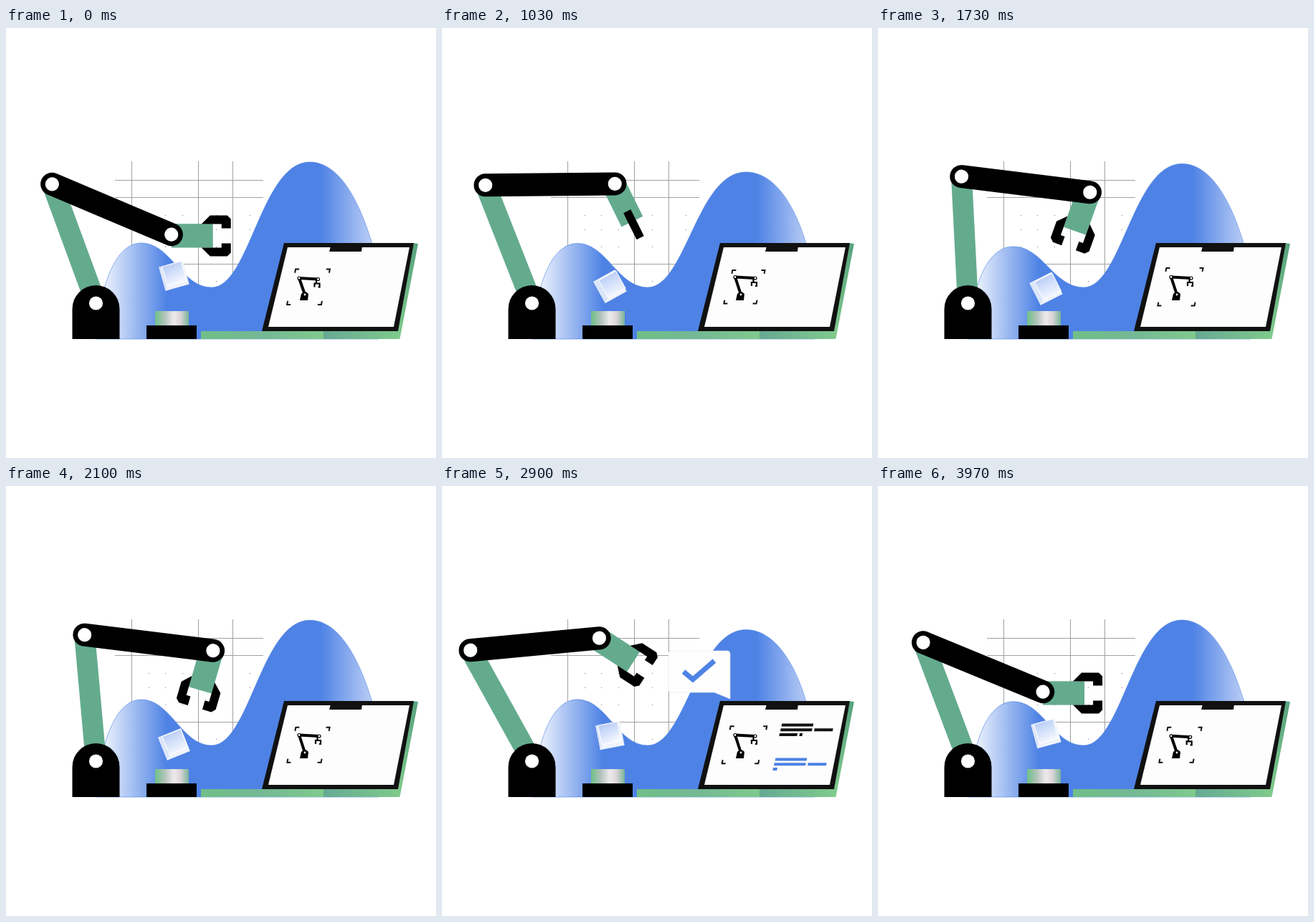
Write an HTML page that moves like this. It is 600 px wide and 600 px high and loops after 4010 ms.

```html
<!DOCTYPE html>
<html lang="en">
<head>
<meta charset="utf-8">
<title>Robot arm</title>
<style>
  html, body { margin: 0; width: 100%; height: 100%; overflow: hidden; background: #fff; }
  svg { display: block; width: 100vw; height: 100vh; }
</style>
</head>
<body>
<svg viewBox="0 0 600 600">
  <defs>
    <linearGradient id="waveFill" gradientUnits="userSpaceOnUse" x1="138" x2="514" y1="0" y2="0">
      <stop offset="0" stop-color="#eaf1fd"/>
      <stop offset=".23" stop-color="#4e82e5"/>
      <stop offset=".8" stop-color="#4e82e5"/>
      <stop offset="1" stop-color="#bfd1f6"/>
    </linearGradient>
    <linearGradient id="knobFill">
      <stop offset="0" stop-color="#6cc087"/>
      <stop offset=".3" stop-color="#b5c3bd"/>
      <stop offset=".55" stop-color="#eceaec"/>
      <stop offset=".75" stop-color="#dcd5da"/>
      <stop offset="1" stop-color="#79b497"/>
    </linearGradient>
    <linearGradient id="deckFill">
      <stop offset="0" stop-color="#70bf87"/>
      <stop offset=".3" stop-color="#74b895"/>
      <stop offset=".617" stop-color="#80c98c"/>
      <stop offset=".617" stop-color="#66a994"/>
      <stop offset="1" stop-color="#7fca8c"/>
    </linearGradient>
    <linearGradient id="sideFill" x1="0" x2="0" y1="0" y2="1">
      <stop offset="0" stop-color="#57a37e"/>
      <stop offset="1" stop-color="#82ca8c"/>
    </linearGradient>
    <linearGradient id="cubeFill" x1="0" y1="0" x2=".5" y2="1">
      <stop offset="0" stop-color="#a8c1f3"/>
      <stop offset="1" stop-color="#f6f9ff"/>
    </linearGradient>
    <clipPath id="wipe"><rect id="wipeBox" x="440" y="320" height="100"/></clipPath>
  </defs>

  <path d="M175.5 186V360M268.5 186V370M316.5 186V370M152 212.5H359M152 236.5H359M152 329.5H359" stroke="#a0a0a0" fill="none"/>
  <g id="dots" fill="#777"></g>
  <path id="wave" fill="url(#waveFill)" stroke="#4e82e5" stroke-width=".6"/>

  <rect x="272" y="423" width="277" height="11" fill="url(#deckFill)"/>
  <path d="M567 300L575 301L549.5 434L545 423Z" fill="url(#sideFill)"/>
  <path d="M388 300H569L547 423H357Z" fill="#111"/>
  <path d="M393 306H563L541 417H366Z" fill="#fdfdfd"/>
  <path d="M453 305H497L496 312H451Z" fill="#111"/>

  <path id="corners" fill="none" stroke="#111" stroke-width="2"/>
  <path d="M410 380L412 371Q417 365 422 371L421 380Z"/>
  <path id="miniArm" fill="none" stroke="#000" stroke-width="4" stroke-linejoin="round"/>
  <path id="miniClaw" d="M-1 0V4M-3.5 10V5H3.5V10H1.5" fill="none" stroke="#000" stroke-width="2.2"/>
  <g id="miniJoints" fill="#fff" stroke="#000" stroke-width="1.2">
    <circle r="2" cx="417" cy="372"/><circle r="2"/><circle r="2"/>
  </g>
  <g clip-path="url(#wipe)">
    <path id="darkText" fill="#111"/>
    <path id="blueText" fill="#4e82e5"/>
  </g>

  <rect x="196" y="415" width="70" height="19"/>
  <rect x="208" y="395" width="47" height="20" fill="url(#knobFill)"/>
  <path id="cube" fill="#eff3fb"/>
  <path id="cubeSide" fill="#dce6f9"/>
  <path id="cubeFace" fill="url(#cubeFill)" stroke="#fff"/>

  <rect id="lower" x="-14.5" y="-177" width="29" height="177" fill="#64ab8e"/>
  <g id="hand">
    <rect y="-14.8" width="58" height="33.2" fill="#64ab8e"/>
    <path id="jawA"/>
    <path id="jawB"/>
  </g>
  <g id="upper">
    <rect x="-16.2" y="-16" width="213" height="32" rx="16"/>
    <circle r="9.6" fill="#fff"/>
    <circle r="9.6" cx="180.6" fill="#fff"/>
  </g>
  <path d="M92.5 434V392A33 33 0 0 1 158.5 392V434Z"/>
  <circle cx="125.5" cy="384" r="9.6" fill="#fff"/>

  <g id="bubble">
    <path d="M-82 -67H-4Q0 -67 0 -63V0L-22 -9H-82Q-86 -9 -86 -13V-63Q-86 -67 -82 -67Z" fill="#fefefe" stroke="#e6e8ec" stroke-width=".7"/>
    <path d="M-65 -38L-52 -27L-22 -53" fill="none" stroke="#4e82e5" stroke-width="7"/>
  </g>
</svg>
<script>
const LOOP = 4010, LOWER = 177, UPPER = 180.6, RAD = Math.PI / 180;
const $ = id => document.getElementById(id);
const set = (id, name, value) => $(id).setAttribute(name, value);
const clamp = x => Math.max(0, Math.min(1, x));
const ramp = (t, start, length) => clamp((t - start) / length);
const smooth = u => u * u * (3 - 2 * u);
// Cosine that completes `cycles` per loop and peaks at `peak`
const swing = (t, peak, cycles = 1) => Math.cos(2 * Math.PI * cycles * (t - peak) / LOOP);
const poly = pts => 'M' + pts.map(p => p.map(n => n.toFixed(2)).join(' ')).join('L') + 'Z';

// Arm poses: time, then the angles of lower arm, upper arm and hand
const poses = [
  [0, 20.2, 22.9, 0],
  [1030, 21.5, -.6, 63.5],
  [1730, 2.9, 7, 109.7],
  [2470, 10.4, 7, 97.4],
  [2900, 29, -5.4, 33],
  [3600, 37.2, 1, 0]];

// Periodic cubic that never overshoots its keys
function sample(keys, t) {
  const n = keys.length;
  const key = (i, j) => keys[(i + n) % n][j];
  const time = i => key(i, 0) + LOOP * Math.floor(i / n);
  let i = n - 1;
  while (i > 0 && keys[i][0] > t) i--;
  const span = time(i + 1) - time(i), u = (t - time(i)) / span;
  return keys[0].slice(1).map((_, c) => {
    const rate = k => (key(k + 1, c + 1) - key(k, c + 1)) / (time(k + 1) - time(k));
    const slope = k => {
      const a = rate(k - 1), b = rate(k);
      return a * b > 0 ? 2 * a * b / (a + b) : 0;
    };
    const a = key(i, c + 1), b = key(i + 1, c + 1);
    return a + (b - a) * smooth(u)
      + span * u * (1 - u) * ((1 - u) * slope(i) - u * slope(i + 1));
  });
}

function drawWave(t) {
  const left = 300 - 6.5 * swing(t, LOOP / 8, 2);
  const drop = 7 - 7 * swing(t, 0, 2), right = 187 + drop;
  set('wave', 'd', `M125 434C133 350 155 ${left} 189 ${left}C230 ${left} 245 362 287 362`
    + `C340 362 356 ${right} 424 ${right}C468 ${right} 496 ${250 + drop / 2} ${512 - drop * .2} 305L520 434Z`);
}

function drawArm(t) {
  const [tilt, bend, turn] = sample(poses, t);
  const ex = 125.5 - LOWER * Math.sin(tilt * RAD), ey = 384 - LOWER * Math.cos(tilt * RAD);
  const wx = ex + UPPER * Math.cos(bend * RAD), wy = ey + UPPER * Math.sin(bend * RAD);
  set('lower', 'transform', `translate(125.5 384) rotate(${-tilt})`);
  set('upper', 'transform', `translate(${ex} ${ey}) rotate(${bend})`);
  set('hand', 'transform', `translate(${wx} ${wy}) rotate(${turn})`);

  // The claw rolls half a turn about its own axis; edge-on it is a plain bar
  const open = Math.abs(Math.cos(Math.PI * smooth(ramp(t, 780, 500))));
  const outline = [[42, 16.5], [54, 28.5], [78, 28.5], [83, 23.5],
    [83, 10.5], [70, 10.5], [70, 16.5], [42, 16.5]];
  const jaw = side => poly(outline.map(([x, y], i) =>
    [x, 1.8 + side * (y * open + (i < 4 ? 5.5 : -5.5) * (1 - open))]));
  set('jawA', 'd', jaw(-1));
  set('jawB', 'd', jaw(1));
}

// A glass cube: a large near square and a small far one
function drawCube(t) {
  const y = 353.5 + 10.5 * swing(t, 1550), tilt = -19.5 - 10 * swing(t, 1250);
  const square = (cx, cy, radius) => [225, 315, 45, 135].map(a =>
    [cx + radius * Math.cos((a + tilt) * RAD), cy + radius * Math.sin((a + tilt) * RAD)]);
  const near = square(234.5, y, 24.3);
  const far = square(235.5 + 2 * swing(t, 1250), y - 3, 19.5);
  set('cube', 'd', poly(near));
  set('cubeSide', 'd', poly([near[0], far[0], far[3], near[3]]));
  set('cubeFace', 'd', poly(far));
}

// Four slanted lines of words, typed up to `left` units of length
function typed(x0, y0, left) {
  const lines = [[44], [44, 26], [25, 25], [14, 25]];
  let d = '';
  lines.forEach((words, row) => {
    let x = x0 - 1.6 * row + (row === 3 ? 15 : 0);
    for (const word of words) {
      const w = clamp(left / word) * word;
      if (w > 0) d += `M${x + .4} ${y0 + 6.7 * row - 2}h${w}l-.8 4h${-w}Z`;
      x += word + 3;
      left -= word;
    }
  });
  return d;
}

function drawScreen(t) {
  const grow = 1.5 * swing(t, 363, 3) - .4;
  const corner = (x, y, sx, sy) =>
    `M${x + sx * (grow - 5)} ${y + sy * grow}h${sx * 5}l${sy} ${-sy * 5}`;
  set('corners', 'd', corner(403.5, 336, -1, -1) + corner(452.5, 336, 1, -1)
    + corner(391.5, 386.5, -1, 1) + corner(440.5, 386.5, 1, 1));

  const lift = 1.5 * ramp(Math.min(t, LOOP - t), 0, 300);
  const elbow = [409, 349 - lift], wrist = [435.5 + lift, 350.5 - lift];
  set('miniArm', 'd', `M417 372L${elbow}L${wrist}`);
  set('miniClaw', 'transform', `translate(${wrist[0] - 1.5} ${wrist[1] + 1})`);
  const joints = $('miniJoints').children;
  [elbow, wrist].forEach(([x, y], i) => {
    joints[i + 1].setAttribute('cx', x);
    joints[i + 1].setAttribute('cy', y);
  });

  set('darkText', 'd', typed(474, 333.5, (t - 2305) * .24));
  set('blueText', 'd', typed(465, 381.5, (t - 2465) * .275));
  set('wipeBox', 'width', 108 - 90 * ramp(t, 3690, 200));
}

function drawBubble(t) {
  const rest = (1 - ramp(t, 2440, 300)) ** 3 + ramp(t, 3400, 450) ** 3, scale = 1 - rest;
  set('bubble', 'visibility', scale > .01 ? 'visible' : 'hidden');
  set('bubble', 'transform',
    `translate(${402 - 16 * rest} ${297 + 88 * rest}) rotate(${-22 * rest}) scale(${scale})`);
}

for (const y of [261, 281, 305, 353])
  for (const x of [199, 222, 246, 293, 340])
    $('dots').innerHTML += `<rect x="${x}" y="${y}" width="1" height="1"/>`;

function frame() {
  const t = performance.now() % LOOP;
  for (const draw of [drawWave, drawArm, drawCube, drawScreen, drawBubble]) draw(t);
  requestAnimationFrame(frame);
}
frame();
</script>
</body>
</html>
```
